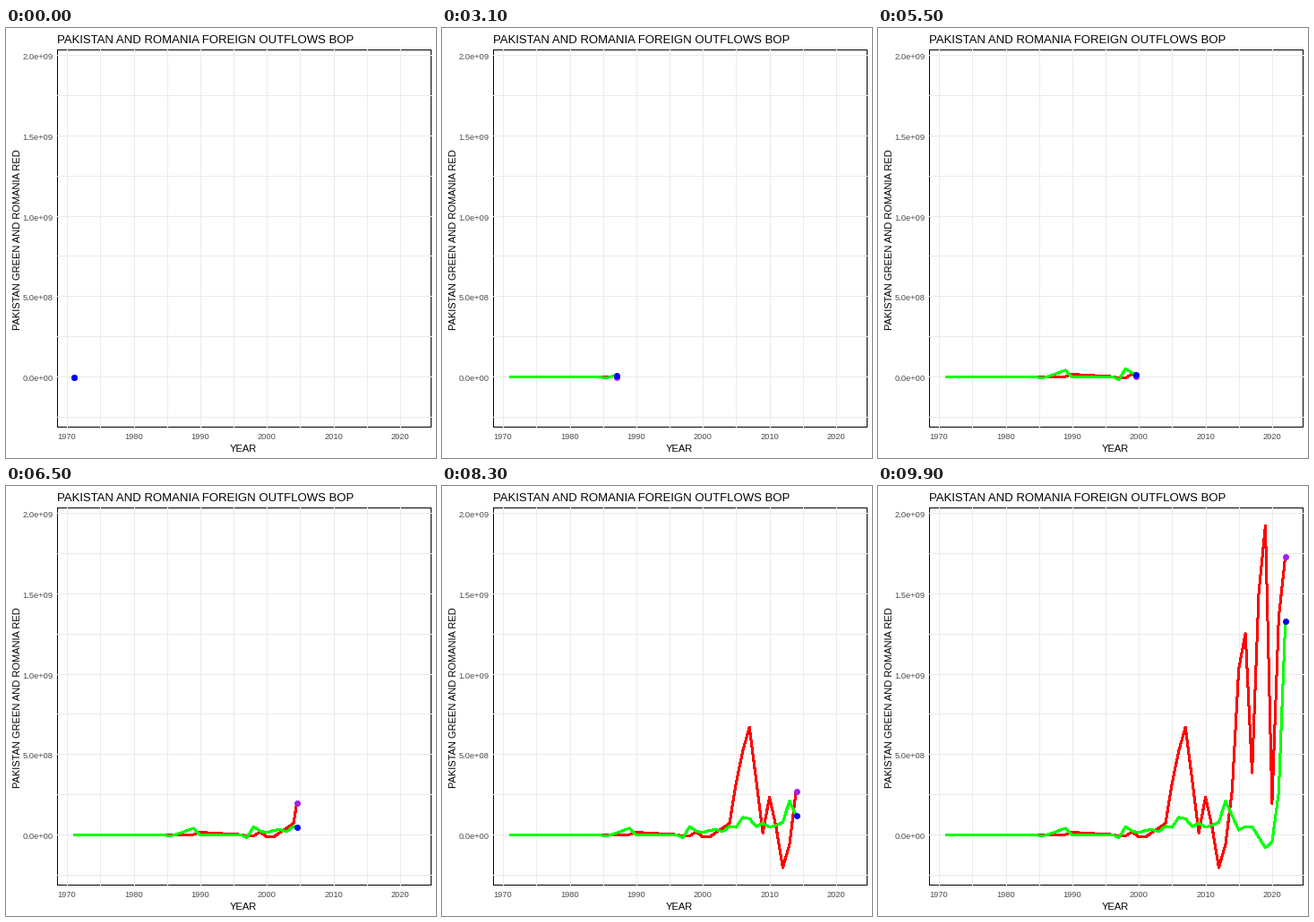
Animation, 480 px wide and 480 px high, one loop 10 s. Source, as a matplotlib script:

```python
import matplotlib.pyplot as plt
import numpy as np
from matplotlib.animation import FuncAnimation
from matplotlib.patches import Rectangle

SIZE, DPI = 480, 96
PT = 72 / DPI                       # one pixel in points
FRAMES, INTERVAL = 100, 100
START, END = 1971, 2022
LEFT, RIGHT, TOP, BOTTOM = 57, 474, 24, 445
GRID, TICK = "#ebebeb", "#4d4d4d"


def bent_path(*turns):
    """Yearly values through turning points (year, value, bend)."""
    values = [turns[0][1]]
    for (y0, v0, *_), (y1, v1, *bend) in zip(turns, turns[1:]):
        u = np.arange(1, y1 - y0 + 1) / (y1 - y0)
        values.extend(v0 + (v1 - v0) * (u + sum(bend) * u * (1 - u)))
    return np.array(values)


# Outflows in millions
YEARS = np.arange(START, END + 1)
ROMANIA = bent_path(
    (START, 0), (1989, 0), (1990, 14), (1996, 0), (1998, -9, 2), (1999, 17),
    (2001, -15, 2), (2004, 70), (2007, 668, .4), (2009, 10), (2010, 233),
    (2012, -206, -.3), (2014, 270, -.8), (2016, 1252, 1.1), (2017, 384),
    (2019, 1922, .9), (2020, 195), (END, 1733, 1))
PAKISTAN = bent_path(
    (START, 0), (1982, 0), (1986, -5, 1.5), (1989, 40), (1990, -5),
    (1996, 0), (1997, -20), (1998, 49), (2000, 12, 1), (2002, 31, 1),
    (2003, 18), (2005, 45, 3), (2006, 107), (2008, 50, -1.4), (2009, 70),
    (2010, 46), (2012, 76, -.5), (2013, 208), (2015, 28), (2017, 50, 2),
    (2019, -82), (2020, -48), (END, 1328, -1.1))


def px(year):
    return 56.7 + (year - 1968.45) * 7.433


def py(millions):
    return 389.1 - millions * 0.1795


fig = plt.figure(figsize=(SIZE / DPI, SIZE / DPI), dpi=DPI, facecolor="white")
ax = fig.add_axes([0, 0, 1, 1])
ax.set_xlim(0, SIZE)
ax.set_ylim(SIZE, 0)
ax.axis("off")


def label(x, y, text, size, color="black", **kw):
    ax.text(x, y, text, fontsize=size * PT, color=color,
            family="Liberation Sans", **kw)


def rule(xs, ys):
    ax.plot(xs, ys, color=GRID, lw=PT, antialiased=False,
            solid_capstyle="butt", zorder=2)


ax.add_patch(Rectangle((LEFT, TOP), RIGHT - LEFT, BOTTOM - TOP, fill=False,
                       ec="black", lw=PT, antialiased=False, zorder=1))

for year in range(1970, 2021, 5):
    x = round(px(year))
    rule([x, x], [TOP, BOTTOM])
    if year % 10 == 0:
        label(x, 459, str(year), 9.2, TICK, ha="center")

for value in range(-250, 2001, 250):
    y = round(py(value))
    rule([LEFT, RIGHT], [y, y])
    if value % 500 == 0:
        label(52.5, y + 5, f"{value * 1e6:.1e}", 9.4, TICK, ha="right")

label(57, 17, "PAKISTAN AND ROMANIA FOREIGN OUTFLOWS BOP", 13.1)
label(265, 473, "YEAR", 11.1, ha="center")
label(16, 236, "PAKISTAN GREEN AND ROMANIA RED", 11.1, rotation=90,
      rotation_mode="anchor", ha="center", va="baseline")


def make_series(values, line_color, dot_color, z):
    line, = ax.plot([], [], color=line_color, lw=2 * PT, zorder=z,
                    antialiased=False, solid_capstyle="butt",
                    solid_joinstyle="round")
    dot, = ax.plot([], [], "o", color=dot_color, ms=7 * PT, mew=0,
                   antialiased=False, zorder=z + 1)
    return values, line, dot


series = [make_series(ROMANIA, "#ff0000", "#a020f0", 3),
          make_series(PAKISTAN, "#00ff00", "#0000ff", 5)]


def update(i):
    # The reveal advances in half-year steps
    now = START + round(i * 2 * (END - START) / (FRAMES - 1)) / 2
    past = YEARS < now
    xs = px(np.append(YEARS[past], now))
    artists = []
    for values, line, dot in series:
        ys = py(np.append(values[past], np.interp(now, YEARS, values)))
        line.set_data(xs, ys)
        dot.set_data(xs[-1:] + .5, ys[-1:] + .5)
        artists += [line, dot]
    return artists


anim = FuncAnimation(fig, update, frames=FRAMES, interval=INTERVAL,
                     repeat=True, repeat_delay=0)
plt.show()
```
